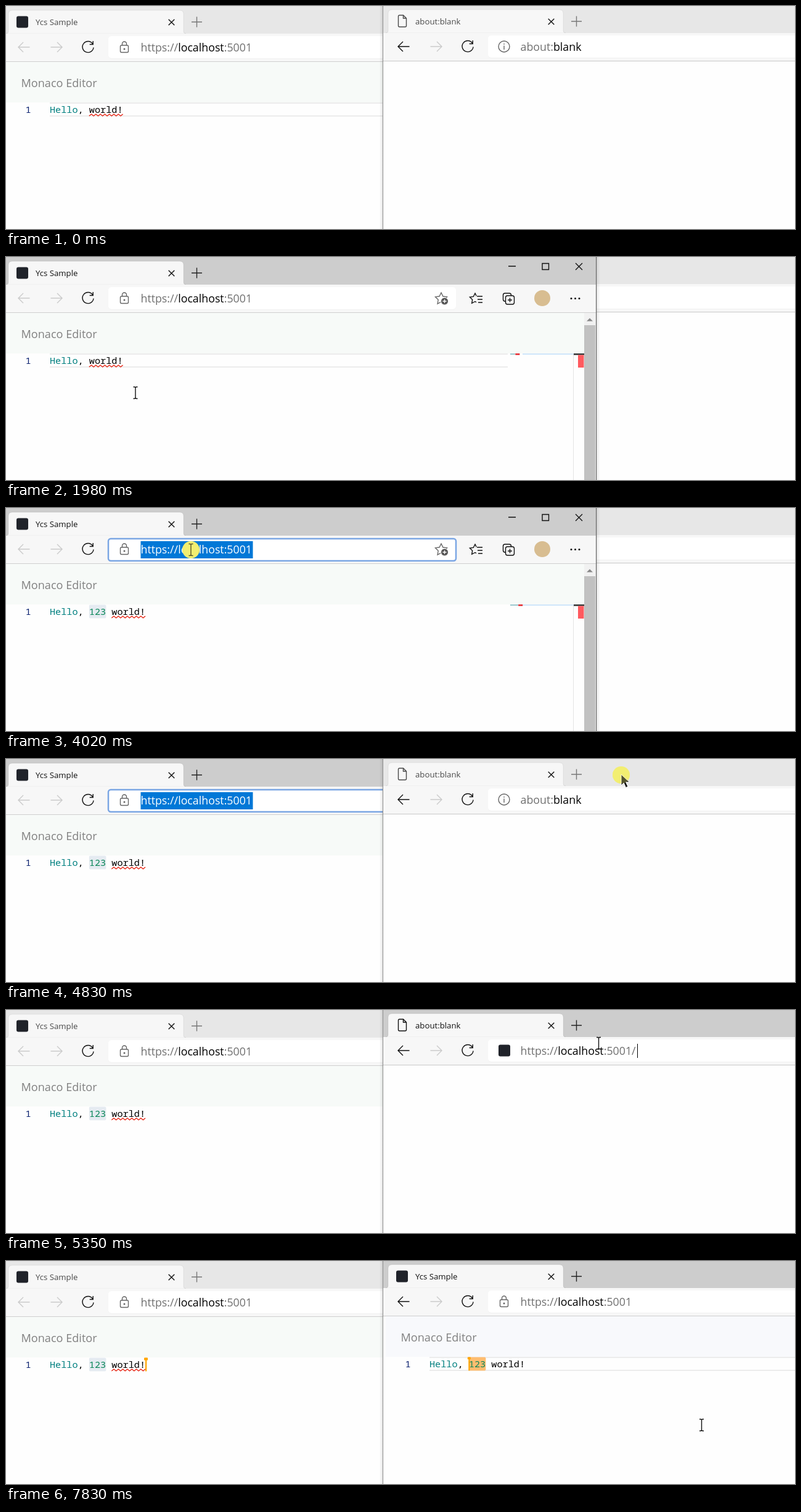
An HTML page that plays this animation: 1280x363 px, repeating every 8000 ms.

```html
<!DOCTYPE html>
<html lang="en">
<head>
<meta charset="utf-8">
<title>Shared editor</title>
<style>
html, body { margin: 0; width: 100%; height: 100%; overflow: hidden; background: #fefefe; }
svg { display: block; width: 1280px; height: 363px; }
text { font-family: "Open Sans", "Noto Sans", sans-serif; font-size: 17.8px; white-space: pre; }
.win { --bar: #e7e7e7; --ink: #4a4a4a; --plus: #777; }
.win.active { --bar: #cdcdcd; --ink: #111; --plus: #222; }
.bar { fill: var(--bar); }
.title { font-size: 13.2px; fill: var(--ink); }
.heading { font-size: 18.1px; fill: #808080; }
.code { font-family: "Noto Sans Mono", "DejaVu Sans Mono", monospace; font-size: 15.2px; }
.dim { fill: #707070; }
.line { fill: none; stroke: #111; stroke-width: 1.4; }
.plus { stroke: var(--plus); }
.ink { stroke: var(--ink); }
.pale { stroke: #cbcbcb; }
.soft { stroke: #666; }
</style>
</head>
<body>
<svg id="stage" viewBox="0 0 1280 363">
  <defs>
    <linearGradient id="shade">
      <stop offset="0" stop-color="#000" stop-opacity="0"/>
      <stop offset="1" stop-color="#000" stop-opacity=".1"/>
    </linearGradient>
  </defs>
  <g id="mouse">
    <circle id="glow" r="14" fill="#f2ee72"/>
    <path id="beam" class="line"
      d="M-3.5-9.5H-1.5Q0-9.5 0-8V8Q0 9.5-1.5 9.5H-3.5M3.5-9.5H1.5Q0-9.5 0-8M0 8Q0 9.5 1.5 9.5H3.5"/>
    <path id="arrow" fill="#111" stroke="#fff" d="M0-1V17L4.300 13L7.500 20.500L11 19L7.700 11.800H13.500Z"/>
    <circle id="haze" r="14" fill="#f2ee72" opacity=".3"/>
  </g>
</svg>
<script>
const LOOP = 8000, CHAR = 9.12, CODE_X = 71;
const col = n => CODE_X + n * CHAR;

// Markup shown only in the listed time ranges
const on = (times, markup) => `<g data-on="${times}">${markup}</g>`;
const rect = (x, y, w, h, fill, rx = 0) =>
  `<rect x="${x}" y="${y}" width="${w}" height="${h}" fill="${fill}" rx="${rx}"/>`;
const line = (d, cls = '') => `<path class="line ${cls}" d="${d}"/>`;
const text = (x, y, s, cls = '') => `<text x="${x}" y="${y}" class="${cls}">${s}</text>`;
const code = (x, s, fill = '#000') => `<text x="${x}" y="174" class="code" fill="${fill}">${s}</text>`;
const cross = (x, y, r) => line(`M${x - r} ${y - r}l${2 * r} ${2 * r}m0 ${-2 * r}l${-2 * r} ${2 * r}`);

const icon = {
  app: (x, y) => rect(x - 9.5, y - 9.5, 19, 19, '#20232a', 3),
  page: line('M20.500 18q0-2 2-2h6l5 5v12q0 2-2 2h-9q-2 0-2-2zM28.500 16v5h5', 'ink'),
  lock: '<rect class="line soft" x="185.500" y="64" width="13" height="11.500" rx="2"/>'
    + line('M188.500 64v-2.500a3.500 3.500 0 0 1 7 0V64', 'soft')
    + '<circle cx="192" cy="70" r="1.500" fill="#666"/>',
  info: '<circle class="line soft" cx="192" cy="67" r="9"/>' + line('M192 65.500v6.500M192 62v1.800', 'soft'),
  reload: line('M140.500 61.500A9 9 0 1 0 142 67.500M141.200 57v5.500h-5.500'),
  stop: cross(133, 67, 6.5),
};

function star(x, y, r) {
  const pts = Array.from({ length: 10 }, (_, i) => {
    const a = i * Math.PI / 5, q = i % 2 ? r * .5 : r;
    return `${(x + q * Math.sin(a)).toFixed(1)} ${(y - q * Math.cos(a)).toFixed(1)}`;
  });
  return `M${pts.join('L')}Z`;
}

const url = tail =>
  text(218.5, 74.3, `<tspan class="dim">https://</tspan>localhost<tspan class="dim">:5001${tail}</tspan>`);
const ring = '<rect x="166" y="50" width="564" height="36" rx="4" fill="none" stroke="#7ba6e4" stroke-width="2.500"/>';
const picked = (w, s) => ring + rect(218.5, 54, w, 28, '#0078d7')
  + `<text x="218.500" y="74.300" fill="#fff">${s}</text>`;

const codeLine = mid => code(CODE_X, 'Hello<tspan fill="#000">,</tspan>', '#008080')
  + code(col(7), mid, '#098658') + code(col(7 + mid.length), 'world!');

function squiggle(at) {
  let d = `M${col(at)} 179`;
  for (let i = 0; i < 15; i++) d += `l3.650 ${i % 2 ? 3 : -3}`;
  return `<path d="${d}" fill="none" stroke="#e51400" stroke-width="1.200"/>`;
}

// Typed line with its error mark and the tiny overview on the right
function typed(mid) {
  const at = 7 + mid.length, mark = 818 + at * 1.2;
  return codeLine(mid) + squiggle(at)
    + rect(818, 157, at * 1.2, 2, '#9cc8cf') + rect(mark, 157, 7, 2.5, '#e5282e');
}

const caret = c => rect(col(c) - .8, 157.5, 2, 22, '#000');
const lineFrame = rect(CODE_X, 157, 743, 2, '#ececec') + rect(CODE_X, 178, 743, 2, '#ececec');
const editorHead = fill => rect(0, 91, 938, 66, fill) + text(24.5, 132, 'Monaco Editor', 'heading');
const lineNumber = code(31.5, '1', '#0b216f');
const selection = fill => rect(col(7), 157.5, 27.5, 22, fill, 2);
const peer = c => rect(col(c), 157.5, 2.2, 22, '#ffa500') + rect(col(c) - 2, 157.5, 6, 4, '#ffa500');

const sideTools = line(star(706, 68, 10), 'soft')
  + '<circle cx="711.500" cy="72" r="6" fill="#555" stroke="#fff"/><path d="M708.500 72h6m-3-3v6" stroke="#fff" stroke-width="1.300"/>'
  + line(star(761, 68, 9)) + rect(763, 63, 11, 14, '#f7f7f7') + line('M764 64h9M765 69h8M766 74h7')
  + '<rect class="line" x="806.500" y="59" width="13" height="13" rx="3"/><rect x="810.500" y="63" width="14" height="14" rx="3" fill="#f7f7f7" stroke="#111" stroke-width="1.400"/>'
  + line('M817.500 66.500v7m-3.500-3.500h7')
  + '<circle cx="870" cy="67" r="13" fill="#d8bd91"/>'
  + [917, 923.5, 930].map(x => `<circle cx="${x}" cy="67.500" r="1.500" fill="#111"/>`).join('');

const frameTools = line('M815 15h12M870 10.500h10.500v10h-10.500z') + cross(929.5, 15.5, 5.5);

const scrollbar = rect(920, 157, 1, 206, '#e4e4e4') + rect(838, 157, 83, 2, '#cfe6fb')
  + rect(921, 157, 17, 2.5, '#333') + rect(928, 159.5, 9.5, 20.5, '#ff5a5f')
  + rect(938, 91, 19, 273, '#f1f1f1') + rect(938, 111, 18, 253, '#c1c1c1')
  + '<path d="M942 104.500l5-5 5 5z" fill="#888"/>';

function addWindow({ id, x, y, back, tabIcon, title, load, address, page }) {
  const g = document.createElementNS('http://www.w3.org/2000/svg', 'g');
  g.id = id;
  g.setAttribute('class', 'win');
  g.setAttribute('transform', `translate(${x} ${y})`);
  g.innerHTML = rect(-10, 0, 5, 364, 'url(#shade)')
    + '<rect x="957" width="7" height="364" fill="url(#shade)" transform="rotate(180 960.500 182)"/>'
    + rect(-5, 0, 963, 365, '#fefefe')
    + '<rect class="bar" x="-5" width="963" height="46"/>'
    + '<path d="M0 45q4 0 4-4V13q0-6 6-6H282q6 0 6 6v28q0 4 4 4z" fill="#f7f7f7" stroke="#000" stroke-opacity=".06"/>'
    + rect(-5, 45, 962, 46, '#f7f7f7') + rect(-5, 90, 962, 1.2, '#cfcfcf')
    + tabIcon + title + cross(268.5, 26.5, 4.8) + line('M301 26h17m-8.500-8.500v17', 'plus')
    + line('M38.500 67H20m8-8l-8 8 8 8', back) + line('M72.500 67H91m-8-8l8 8-8 8', 'pale')
    + load + rect(166, 49, 564, 37, '#f2f2f2', 5) + rect(166, 49, 564, 36, '#fff', 5)
    + address + sideTools + frameTools + page
    + rect(-5, 0, 1, 365, '#8c8c8c') + rect(957, 0, 1.2, 365, '#666');
  stage.insertBefore(g, mouse);
  return g;
}

const left = addWindow({
  id: 'left', x: 0, y: 0, back: 'pale',
  tabIcon: icon.app(26.5, 26), title: text(48, 31, 'Ycs Sample', 'title'), load: icon.reload,
  address: icon.lock + url('') + on('4020-4930', picked(182, 'https://localhost:5001')),
  page: editorHead('#f7faf8') + on('0-3210', lineFrame) + scrollbar + lineNumber
    + on('3210-4020', selection('#add6ff')) + on('4020-8000', selection('#e5ebf1'))
    + on('0-2590', typed('')) + on('2590-2800', typed(' '))
    + on('2800-2900', typed('12 ')) + on('2900-8000', typed('123 '))
    + on('240-760 1270-1480', caret(13)) + on('1480-1980 2190-2490', caret(6))
    + on('2590-2800 3210-3310', caret(7)) + on('2800-2900', caret(9)) + on('2900-3100', caret(10))
    + on('7330-8000', peer(17)),
});

const dots = [0, 1, 2, 3, 4].map(i => {
  const a = (-158 + i * 29) * Math.PI / 180;
  return `<circle cx="${26.5 + 8 * Math.cos(a)}" cy="${26 + 8 * Math.sin(a)}" r="${1.4 + i * .2}" fill="#0f62ac"/>`;
}).join('');

const right = addWindow({
  id: 'right', x: 616, y: -1, back: '',
  tabIcon: on('0-5650', icon.page) + on('5650-7630', `<g id="spinner">${dots}</g>`)
    + on('7630-8000', icon.app(26.5, 26)),
  title: on('0-6190', text(48, 31, 'about:blank', 'title')) + on('6190-8000', text(48, 31, 'Ycs Sample', 'title')),
  load: on('0-5650 7530-8000', icon.reload) + on('5650-7530', icon.stop),
  address: on('0-5350', icon.info + text(218.5, 74.3, '<tspan class="dim">about:</tspan>blank'))
    + on('5040-5350', picked(99, 'about:blank'))
    + on('5350-6190', icon.app(192.5, 67)) + on('6190-8000', icon.lock)
    + on('5350-6150', url('/')) + on('6150-8000', url(''))
    + on('5350-5550', rect(408, 56, 1, 23, '#000')),
  page: on('6810-8000', editorHead('#f8f9fc'))
    + on('7130-8000', lineFrame + lineNumber)
    + on('7330-8000', selection('#ffbd70'))
    + on('7130-8000', codeLine('123 '))
    + on('7330-8000', rect(col(7) - .5, 157.5, 2, 22, '#ffa500') + rect(col(7) - 2, 157.5, 5, 3.5, '#ffa500'))
    + on('7230-7730', caret(17)),
});

// time, x, y, pointer shape, pressed
const moves = [
  [0, 0, 0, ''], [450, 249, 331, 'beam'], [550, 194, 168, 'beam'], [960, 180, 168, 'beam'],
  [1060, 160, 168, 'beam'], [1170, 140, 168, 'beam'], [1270, 125, 168, 'beam'],
  [1480, 125, 168, 'beam', 1], [1580, 125, 168, 'beam'], [1780, 210, 221, 'beam'],
  [3610, 214, 214, 'beam'], [3710, 236, 150, 'arrow'], [3810, 268, 100, 'arrow'],
  [3920, 300, 68, 'beam'], [4020, 300, 68, 'beam', 1], [4120, 300, 68, 'beam'],
  [4530, 420, 66, 'beam'], [4630, 720, 46, 'arrow'], [4730, 998, 27, 'arrow'],
  [4830, 998, 26, 'arrow', 1], [4930, 998, 26, 'arrow'], [5040, 961.5, 54, 'beam', 1],
  [5140, 961.5, 54, 'beam'], [7630, 1010, 110, 'beam'], [7730, 1085, 205, 'beam'], [7830, 1128.5, 267, 'beam'],
];

const within = (t, from, to) => t >= from && t < to;
const show = (el, yes) => { el.style.display = yes ? '' : 'none'; };
const timed = [...document.querySelectorAll('[data-on]')].map(el =>
  ({ el, spans: el.dataset.on.split(' ').map(s => s.split('-').map(Number)) }));
const spinner = document.getElementById('spinner');
const start = performance.now();

function draw() {
  const t = (performance.now() - start) % LOOP;
  for (const { el, spans } of timed) show(el, spans.some(([a, b]) => within(t, a, b)));

  left.classList.toggle('active', within(t, 1580, 4930));
  right.classList.toggle('active', t >= 4930);
  const front = within(t, 1480, 4830) ? left : right;
  if (mouse.previousElementSibling !== front) stage.insertBefore(front, mouse);

  spinner.setAttribute('transform', `rotate(${Math.floor((t - 6310) / 40) * 15} 26.5 26)`);

  const [, x, y, shape, pressed] = moves.findLast(m => m[0] <= t);
  mouse.setAttribute('transform', `translate(${x} ${y})`);
  show(beam, shape === 'beam');
  show(arrow, shape === 'arrow');
  show(glow, pressed);
  show(haze, pressed);
  requestAnimationFrame(draw);
}
draw();
</script>
</body>
</html>
```
